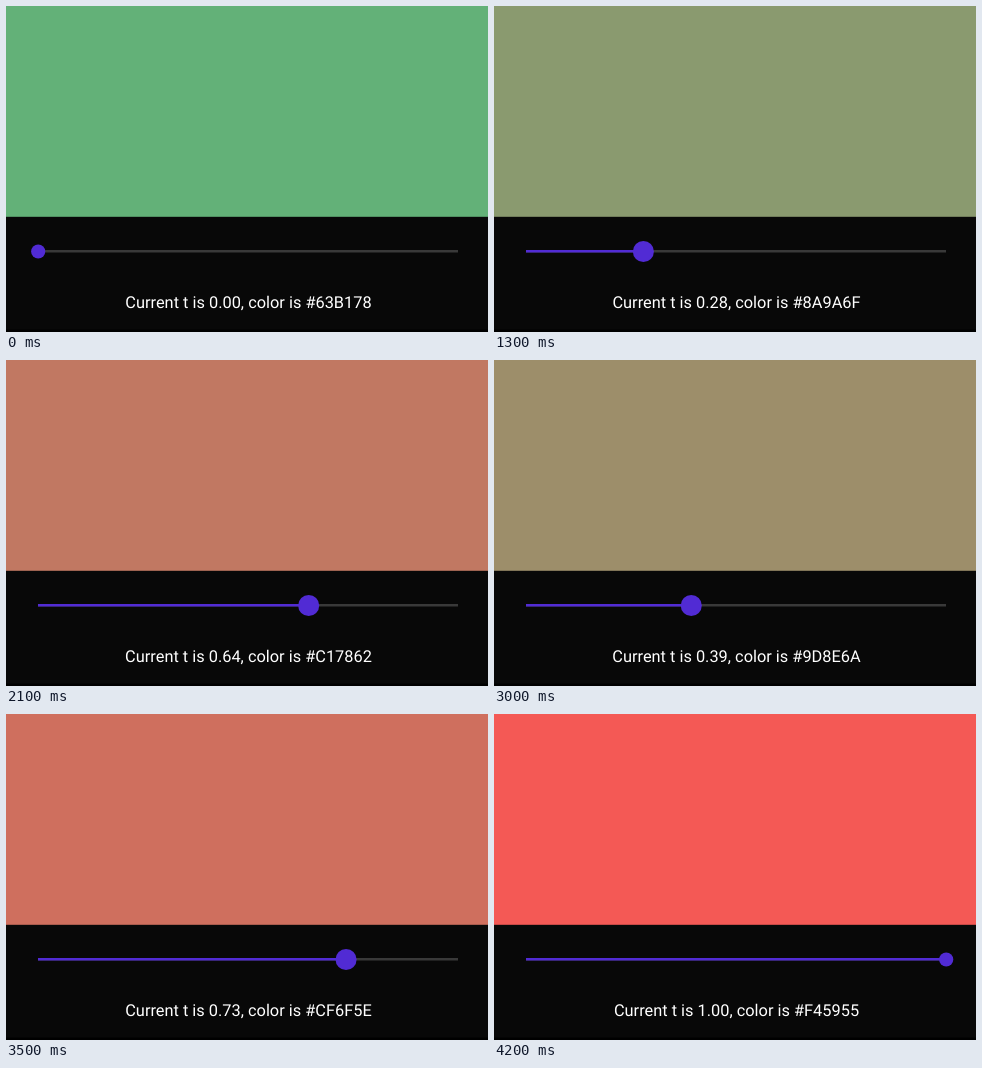
An HTML page that plays this animation: 482 px wide and 326 px high, repeating every 4.8 s.

```html
<!DOCTYPE html>
<html lang="en">
<head>
<meta charset="utf-8">
<title>Colour slider</title>
<style>
  html, body { margin: 0; width: 100%; height: 100%; overflow: hidden; background: #000; }
  svg { display: block; width: 482px; height: 326px; }
  text { font: 16.38px Roboto, sans-serif; fill: #fff; text-anchor: middle; text-rendering: geometricPrecision; }
  line { stroke-width: 2.5; }
</style>
</head>
<body>
<svg viewBox="0 0 482 326">
  <rect width="482" height="323.5" fill="#080808"/>
  <rect id="swatch" width="482" height="210.8"/>
  <line x1="32" x2="452" y1="245.3" y2="245.3" stroke="#393939"/>
  <line id="fill" x1="32" y1="245.3" y2="245.3" stroke="#512bd4"/>
  <circle id="knob" cy="245.5" fill="#512bd4"/>
  <text id="label" x="242.5" y="302"></text>
</svg>
<script>
const LOOP = 4800, TICK = 100;
const FROM = [0x63, 0xB1, 0x78], TO = [0xF4, 0x59, 0x55];
const [swatch, fill, knob, label] =
  ['swatch', 'fill', 'knob', 'label'].map(id => document.getElementById(id));

// Turning points of the drag: time, slider value, value the colour has reached
const drag = [
  [900, 0, 0], [1000, .033, .03], [1300, .279, .27], [1500, .58, .57],
  [1800, .65, .65], [2100, .644, .65], [2300, .644, .65], [2500, .629, .65],
  [2900, .602, .61], [3000, .393, .403], [3100, .25, .26],
  [3500, .733, .751], [3800, 1, 1]
];

const ramp = (x, a, b) => Math.min(1, Math.max(0, (x - a) / (b - a)));

// Linear path through the turning points, clamped at both ends
function path(ms, col) {
  return drag.reduce((v, key, i) =>
    i ? v + (key[col] - drag[i - 1][col]) * ramp(ms, drag[i - 1][0], key[0]) : v, 0);
}

function mix(c) {
  const hex = FROM.map((a, i) => a + Math.trunc((TO[i] - a) * c + Math.sign(TO[i] - a) * 1e-6))
    .map(v => v.toString(16).padStart(2, '0')).join('');
  return '#' + hex.toUpperCase();
}

function draw(now) {
  const ms = Math.floor(now % LOOP / TICK) * TICK;
  const t = path(ms, 1), color = mix(path(ms, 2));
  const x = 32.2 + 420 * t;
  const press = ramp(ms, 980, 1200) - ramp(ms, 4000, 4200);
  swatch.setAttribute('fill', color);
  fill.setAttribute('x2', Math.min(x, 452));
  knob.setAttribute('cx', x);
  knob.setAttribute('r', 7.1 + 3.45 * press);
  label.textContent = `Current t is ${t.toFixed(2)}, color is ${color}`;
}

const start = performance.now();
function loop() {
  draw(performance.now() - start);
  requestAnimationFrame(loop);
}
loop();
</script>
</body>
</html>
```
